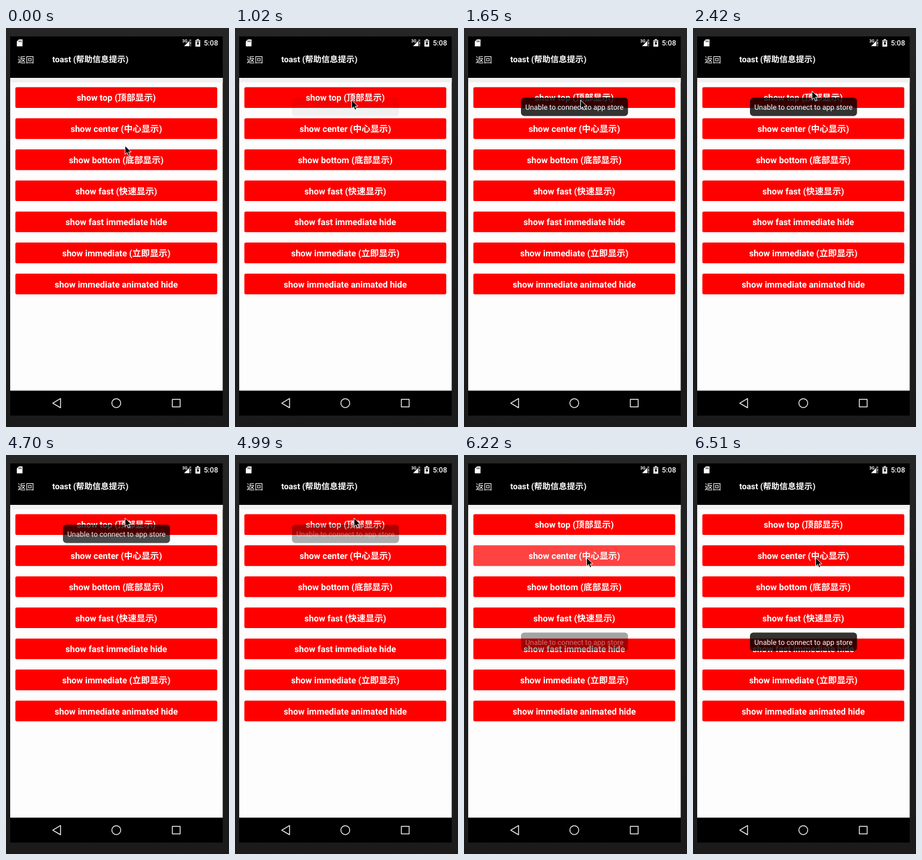
An HTML page for the animation above (8 s loop, 372x664 px).

```html
<!DOCTYPE html>
<html lang="zh-CN">
<head>
<meta charset="utf-8">
<title>toast</title>
<style>
  html, body { margin: 0; width: 100%; height: 100%; overflow: hidden; background: #1e1e1f; }
  svg { display: block; width: 372px; height: 664px; }
  text { font-family: Roboto, "Noto Sans CJK SC", "Noto Sans CJK", sans-serif; fill: #fff; text-rendering: geometricPrecision; }
  .btn text { font-size: 14.64px; font-weight: 700; text-anchor: middle; }
  .btn rect { fill: #f00; }
  .bar { font-size: 13.78px; }
  .toast text { font-size: 12.06px; text-anchor: middle; }
  .toast rect { fill-opacity: .8; }

  .toast > *, .press, .cursor { animation: 8s linear infinite; }
  .top > * { animation-name: top-toast; }
  .center > * { animation-name: center-toast; }
  .press { animation-name: press; }
  .cursor { animation-name: cursor; }

  @keyframes top-toast {
    0%, 12.25% { opacity: 0; }
    20.6%, 58% { opacity: 1; }
    65.25%, 100% { opacity: 0; }
  }
  @keyframes center-toast {
    0%, 74.9% { opacity: 0; }
    81.3%, 100% { opacity: 1; }
  }
  @keyframes press {
    0%, 75% { opacity: 1; }
    76.9% { opacity: .6; }
    79.4%, 100% { opacity: 1; }
  }
  @keyframes cursor {
    0%, 4.7% { transform: translate(198px, 195px); animation-timing-function: ease-in-out; }
    10.5%, 27.6% { transform: translate(194px, 119px); }
    30.25%, 63.4% { transform: translate(198px, 104px); animation-timing-function: ease-in-out; }
    68.25%, 68.7% { transform: translate(198px, 176px); }
    70.2% { transform: translate(197px, 183px); }
    72.5%, 100% { transform: translate(204px, 170px); }
  }
</style>
</head>
<body>
<svg viewBox="0 0 372 664">
  <defs>
    <linearGradient id="desk" x1="0" y1="0" x2="0" y2="1">
      <stop offset="0" stop-color="#262627"/>
      <stop offset=".3" stop-color="#1e1e1f"/>
      <stop offset="1" stop-color="#1b1b1c"/>
    </linearGradient>
  </defs>
  <rect width="372" height="664" fill="url(#desk)"/>
  <rect x="7" y="14" width="354.5" height="631"/>
  <rect x="7" y="83" width="354.5" height="520.5" fill="#fdfdfd"/>
  <rect x="7" y="83" width="354.5" height="7.5" fill="#f0f0f0"/>

  <!-- status bar -->
  <path d="M21.5 19H27.5V30.5H18V22.5Z" fill="#fff"/>
  <path d="M21.6 20.8V23.4M23.5 20.8V23.4M25.4 20.8V23.4" stroke="#000" stroke-width=".9"/>
  <text x="294" y="23.6" font-size="7" font-weight="700">3G</text>
  <path d="M297 30.3L306 21.3V30.3Z" fill="#fff"/>
  <path d="M306 19V22H309V19Z" fill="#777"/>
  <path d="M308 23V27.6M308 28.8V30.3" stroke="#fff" stroke-width="1.3"/>
  <path d="M316 20H318.3V18.6H321.7V20H324V31H316Z" fill="#fff"/>
  <path d="M316.7 20.5H323.3V23H316.7Z" fill="#888"/>
  <path d="M320.8 21.4L317.7 26.4H319.6V29.8L322.5 24.8H320.8Z"/>
  <text x="330" y="28.9" font-size="12.06" font-weight="500">5:08</text>

  <text class="bar" x="19.2" y="57.6">返回</text>
  <text class="bar" x="77.2" y="57.4" font-weight="700">toast (帮助信息提示)</text>

  <g id="buttons"></g>

  <!-- navigation bar -->
  <g fill="none" stroke="#e8e8e8" stroke-width="1.5" stroke-linejoin="round">
    <path d="M91 616.6V632L78 624.3Z"/>
    <circle cx="184" cy="624.3" r="7.4"/>
    <rect x="277.5" y="618" width="13" height="12.6"/>
  </g>

  <g class="toast top">
    <rect x="95" y="116" width="178.6" height="30.4" rx="5.5"/>
    <text x="184.2" y="136">Unable to connect to app store</text>
  </g>
  <g class="toast center">
    <rect x="95" y="295.6" width="178.6" height="30.4" rx="5.5"/>
    <text x="184.2" y="315.6">Unable to connect to app store</text>
  </g>

  <g class="cursor">
    <path d="M.6 1V15.2L3.9 12.1L6.2 17.3L8.7 16.2L6.5 11.2H11Z" stroke="#fff" stroke-width="1"/>
  </g>
</svg>
<script>
  const labels = [
    'show top (顶部显示)', 'show center (中心显示)', 'show bottom (底部显示)', 'show fast (快速显示)',
    'show fast immediate hide', 'show immediate (立即显示)', 'show immediate animated hide'
  ];
  document.getElementById('buttons').innerHTML = labels.map((label, i) => {
    const y = 98.6 + 51.7 * i;
    return `<g class="btn${i === 1 ? ' press' : ''}">
      <rect x="15.6" y="${y}" width="336.8" height="34.4" rx="2.6"/>
      <text x="184" y="${y + 22.8}">${label}</text></g>`;
  }).join('');
</script>
</body>
</html>
```
